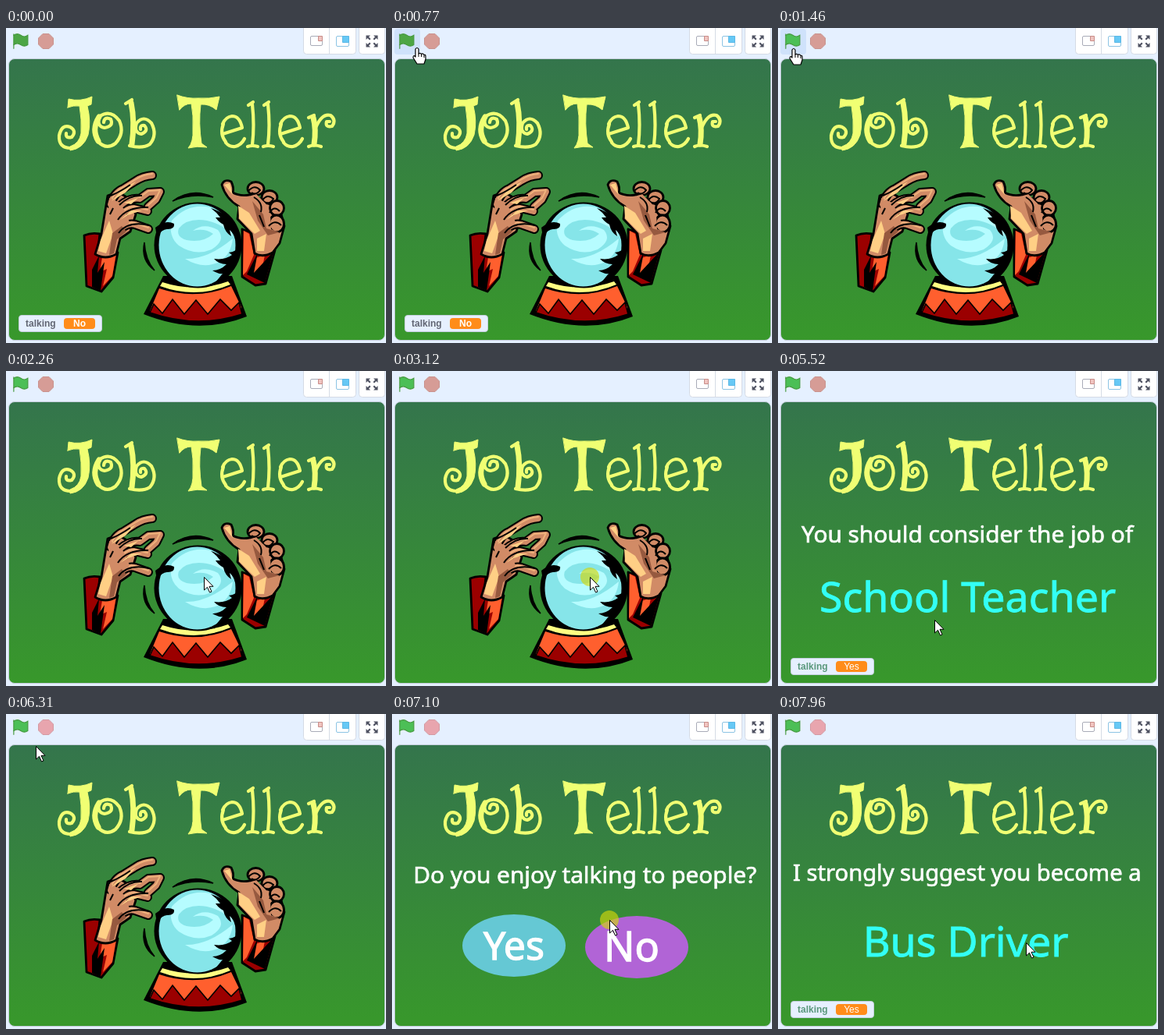
Animation of 486x404 px, one loop 8 s. Source, as an HTML page:

```html
<!DOCTYPE html>
<html lang="en">
<head>
<meta charset="utf-8">
<title>Job Teller</title>
<style>
html, body { margin: 0; width: 100%; height: 100%; overflow: hidden; background: #e5f0ff }
svg { display: block }
.title { fill: none; stroke: #f0ff73; stroke-width: 4.2; stroke-linecap: round; stroke-linejoin: round }
.title .stem { stroke-width: 7 }
.title .solid { fill: #f0ff73; stroke-width: 1 }
.line { font: 400 29.8px "Noto Sans", sans-serif; fill: #fff; stroke: #fff; stroke-width: .7 }
.choice { font-size: 50px; stroke-width: 1.3 }
.job { font-size: 53.7px; fill: #33fff5; stroke: #33fff5; stroke-width: .9 }
.label { font: 12px "Liberation Sans", Arial, sans-serif }
.outline { stroke: #000; stroke-width: 2.8; stroke-linejoin: round }
.skin { fill: #d18b66 }
.light { fill: #ffcf85 }
.shade { fill: #96593f }
.finger { fill: none; stroke-linecap: round; stroke-linejoin: round }
.red { fill: #9b0000 }
.orange { fill: #ff5f2e }
.white { fill: #fff; stroke: #000; stroke-linejoin: round }
</style>
</head>
<body>
<svg width="486" height="404" viewBox="0 0 486 404">
  <defs>
    <linearGradient id="sky" x2="0" y2="1">
      <stop stop-color="#34754c"/><stop offset="1" stop-color="#38982b"/>
    </linearGradient>
    <g id="e"><path d="M277 136L302 128Q299 113 289 113Q281 114 277 123"/><path class="stem" d="M278 123Q273 136 281 146"/><path d="M281 147Q286 153 293 152Q301 150 305 142"/></g>
    <g id="l"><path class="stem" d="M315 98Q318 125 315 150"/><path d="M310 99L316 95M309 152Q315 150 322 152"/></g>
    <path id="corner" d="M1.500 7V1.500H7L5 3.500L7.500 6L6 7.500L3.500 5Z"/>
    <g id="leftFingers" class="finger">
      <path d="M134 226Q138 211 150 206L166 196Q175 190 187 189"/>
      <path d="M146 228Q158 217 171 219L182 211L197 210L192 220L182 229"/>
      <path d="M141 247Q152 231 164 231L181 235"/>
      <path d="M143 262Q153 249 165 252L182 258"/>
    </g>
  </defs>

  <rect id="hover" x="3" y="1" width="33" height="33" rx="4" fill="#cfe2fb"/>
  <g id="flag" stroke="#45993d" stroke-width="1" stroke-linecap="round" transform="translate(9 7) scale(1.17)">
    <path d="M.75 2A6.440 6.440 0 0 1 8.440 2A6.440 6.440 0 0 0 16.130 2V12.400A6.440 6.440 0 0 1 8.440 12.400A6.440 6.440 0 0 0 .75 12.400"/>
    <path d="M.75 16.500V.75"/>
  </g>
  <path id="stop" d="M47 7.500H55L60.500 13V21L55 26.500H47L41.500 21V13Z"/>
  <g fill="#fff" stroke="#d5dbe5">
    <rect x="380.500" y="-4" width="67" height="37.500" rx="4"/>
    <path d="M413.500 0V33"/>
    <rect x="451.500" y="-4" width="33" height="37.500" rx="4"/>
    <rect x="389.500" y="10.500" width="15" height="12" rx="1.500" stroke="#a9acb8"/>
    <rect x="422.500" y="10.500" width="16" height="13" rx="1.500" stroke="#8cc4e4"/>
  </g>
  <path d="M399.500 10.500H404.500V16.500H399.500Z" fill="#f0c4c0" stroke="#c98d88"/>
  <path d="M430.500 10.500H438.500V18.500H430.500Z" fill="#66c8f5" stroke="#5cb8e6"/>
  <g fill="#4f5262" transform="translate(468 17)">
    <use href="#corner" x="-9" y="-9"/>
    <use href="#corner" x="-9" y="-9" transform="scale(-1 1)"/>
    <use href="#corner" x="-9" y="-9" transform="scale(1 -1)"/>
    <use href="#corner" x="-9" y="-9" transform="scale(-1)"/>
  </g>
  <rect x="3.500" y="39.500" width="481" height="361" rx="7.500" fill="url(#sky)" stroke="#c3ccd9"/>

  <g class="title" role="img" aria-label="Job Teller">
    <path class="solid" d="M79 102L80 91Q95 95 110 88L109 98L104 100Q109 120 105 137Q99 155 82 157L82 152Q94 148 96 135Q97 117 94 100Q86 99 79 102Z"/>
    <path d="M83 154Q67 154 68 138Q71 123 82 127Q91 132 84 140Q76 142 77 135"/>
    <path class="stem" d="M119 114Q109 130 118 145"/>
    <path d="M117 145Q128 157 140 148Q152 135 145 119Q134 104 120 113Q115 126 126 128Q138 126 134 117Q126 113 125 121"/>
    <path class="stem" d="M160 96Q165 120 161 149"/>
    <path d="M153 97L161 92M158 151Q175 155 184 149Q194 137 186 122Q176 111 167 122Q163 134 173 136Q183 132 177 125Q171 124 172 130"/>
    <path class="solid" d="M219 86Q232 91 246 90Q260 91 273 88L269 105Q260 97 249 98Q246 122 250 148L257 153Q244 151 233 154Q240 146 239 130Q240 112 237 97Q228 97 222 105Z"/>
    <use href="#e"/><use href="#l"/><use href="#l" x="20"/><use href="#e" x="74"/>
    <path class="stem" d="M393 115Q397 130 394 149"/>
    <path d="M387 115L394 112M387 152Q394 149 403 152M396 128Q404 109 415 112Q423 118 417 126Q408 128 410 120L414 120"/>
  </g>

  <g id="cover">
    <path d="M213 222Q238 204 265 217Q237 211 213 222ZM177 275Q172 298 190 311Q178 297 177 275Z" stroke="#000" stroke-width="1.500"/>
    <!-- crystal ball and stand -->
    <path d="M201 318H289L308 370Q246 395 176 367Z"/>
    <path class="orange" d="M196 334Q243 350 288 331L301 358L300 366Q244 384 184 363Z"/>
    <path class="red" d="M189 354L200 366L213 348L228 367L243 349L258 367L274 348L288 362L298 352L302 367Q244 386 184 365Z" stroke="#000" stroke-width="1.600"/>
    <path d="M200 326Q243 340 284 325L287 329Q243 348 197 331Z" fill="#ffff82"/>
    <ellipse cx="245.500" cy="278.500" rx="56" ry="55"/>
    <ellipse cx="244.500" cy="278.500" rx="49" ry="53" fill="#86e5e9"/>
    <g fill="#b6fcff">
      <path d="M212 247Q233 224 261 230Q286 242 290 268Q280 252 257 247Q232 243 221 257Q217 268 231 272Q252 276 265 264Q254 256 239 260Q253 249 271 259Q282 272 263 284Q242 293 221 279Q207 267 212 247Z"/>
      <path d="M229 296Q258 297 290 270Q288 290 273 300Q252 310 229 296Z"/>
    </g>
    <path d="M262 231Q290 240 298 264L293 271Q291 263 286 259L288 267Q280 262 278 252Q272 249 268 243L274 243Q269 236 262 231ZM300 279Q295 287 285 288L289 291Q280 298 266 296Q272 303 282 303Q274 311 264 311Q272 316 277 315L268 326Q296 314 300 279ZM191 256Q204 245 215 251Q216 258 207 258Q200 257 193 268Z"/>
    <!-- left hand -->
    <path class="outline red" d="M100 266Q109 262 120 264L117 291L143 288L137 320L122 338L103 331Z"/>
    <path class="orange" d="M123 294Q133 296 141 289L136 318L124 331L129 309L120 313Z"/>
    <path d="M110 310L119 292L117 314L126 300L121 337L110 332Z"/>
    <path class="outline skin" d="M130 215Q146 208 156 219L166 239L159 261L146 270L141 290Q127 298 114 290L122 264Z"/>
    <use href="#leftFingers" stroke="#000" stroke-width="12"/>
    <use href="#leftFingers" stroke="#d18b66" stroke-width="7.800"/>
    <use href="#leftFingers" stroke="#efb27c" stroke-width="2" transform="translate(0 -2)"/>
    <path class="skin" d="M132 218L146 224L153 237L158 249L146 267L129 262Z"/>
    <path class="light" d="M135 222L150 206L166 197L153 211ZM151 224L169 218L160 226ZM121 272L132 247L137 264L128 289L118 286ZM146 246L160 234L174 234L156 240Z"/>
    <path class="shade" d="M136 263L148 254L154 261L142 271L138 289L132 291ZM148 216L168 205L183 193L170 204Z"/>
    <path d="M145 227Q158 214 174 215M143 246Q154 229 182 230M144 263Q156 247 183 253M134 215Q148 209 159 201M133 239L137 231" fill="none" stroke="#000" stroke-width="2"/>
    <!-- right hand -->
    <path class="outline red" d="M302 258L313 262L318 289L344 285L332 328L319 330L302 319Z"/>
    <path class="orange" d="M304 260L311 264L317 291L308 312L303 317ZM319 295L331 291L325 323L316 318Z"/>
    <path d="M308 316L322 288L317 314L342 287L331 327Z"/>
    <path class="outline skin" d="M276 201Q279 193 288 197Q292 205 290 211Q299 216 311 214L329 220L351 235L356 254L350 276L341 288Q328 295 318 289L314 264L296 245L298 229Q281 219 276 201Z"/>
    <g class="outline skin">
      <ellipse cx="319.500" cy="206" rx="10.500" ry="8.500"/>
      <ellipse cx="337" cy="217" rx="10" ry="8.500"/>
      <ellipse cx="346.500" cy="231" rx="9" ry="9.500"/>
      <ellipse cx="346" cy="251" rx="9.500" ry="11"/>
    </g>
    <path class="skin" d="M301 219L320 213L332 225L338 238L339 258L350 263L338 282L320 285L317 263L299 243Z"/>
    <path class="light" d="M297 228L311 237L325 260L318 264L298 244ZM321 270L333 264L330 286L321 286ZM279 201L286 199L290 214Z"/>
    <path class="shade" d="M315 222L329 239L333 257L350 262L335 266L322 247Z"/>
    <path d="M310 209Q318 200 325 208Q320 215 314 211M328 221Q334 212 342 219Q338 226 333 224M337 237Q343 227 350 235M336 254Q344 245 352 253M317 217Q329 224 326 236M324 240L330 255" fill="none" stroke="#000" stroke-width="2"/>
  </g>

  <g id="question" class="line">
    <text x="27.200" y="217">Do you enjoy talking to people?</text>
    <ellipse cx="156" cy="297" rx="66" ry="40" fill="#65c8d4" stroke="none"/>
    <ellipse cx="313" cy="299" rx="66" ry="40" fill="#b164d6" stroke="none"/>
    <text class="choice" x="117" y="314.500">Yes</text>
    <text class="choice" style="font-size:52px" x="271" y="317">No</text>
  </g>
  <g id="teacher" class="line">
    <text x="30" y="220">You should consider the job of</text>
    <text class="job" x="53" y="308.500">School Teacher</text>
  </g>
  <g id="driver" class="line">
    <text style="font-size:29.200px" x="19" y="214">I strongly suggest you become a</text>
    <text class="job" x="108.700" y="311">Bus Driver</text>
  </g>

  <g id="monitor" class="label">
    <rect x="16.500" y="368.500" width="106" height="21" rx="3.500" fill="#e6f0ff" stroke="#c3cfdd"/>
    <text id="name" x="25" y="383" font-weight="bold">talking</text>
    <rect x="74" y="372" width="40" height="14" rx="4" fill="#ff8c1a"/>
    <text id="value" x="94" y="383" fill="#fff" text-anchor="middle"></text>
  </g>

  <g id="cursor">
    <circle id="click" r="12" fill="#d2d70a" opacity=".65"/>
    <path id="arrow" class="white" d="M.5 .5V17L4.500 13.300L7.500 20L10 19L7 12.300H12Z"/>
    <g id="hand">
      <path class="white" stroke-width="1.200" d="M-2 2Q0-1 2 2V8Q4 6.500 5.500 8.500Q7.500 7 9 9.500Q11 8.500 11 11.500V15L9 21H0L-5 13Q-5 9-2 12Z"/>
      <path d="M2 8V12M5.500 9V12M9 10V13" stroke="#000"/>
    </g>
  </g>
</svg>
<script>
const LOOP = 8000;
const el = id => document.getElementById(id);
const show = (id, on) => el(id).style.display = on ? '' : 'none';

// cursor stops: time, x, y
const stops = [
  [70, 306, 328], [840, 26, 18], [930, 26, 18], [990, 20, 26], [1460, 20, 26],
  [2260, 253, 264], [3520, 253, 264], [3990, 184, 290], [4840, 184, 290],
  [5060, 200, 322], [5450, 200, 322], [5520, 200, 319], [5840, 20, 25],
  [6220, 20, 25], [6790, 278, 264], [7180, 278, 264], [7650, 317, 293], [LOOP, 317, 293]
];
const clicks = [[1160, 1310], [3120, 3200], [4750, 4920], [6070, 6220], [7030, 7180], [7880, 7960]];
const scenes = [[0, 'cover'], [3200, 'question'], [4840, 'teacher'], [6150, 'cover'], [7100, 'question'], [7960, 'driver']];

function cursorAt(t) {
  const i = Math.max(1, stops.findIndex(s => s[0] > t));
  const [t0, x0, y0] = stops[i - 1], [t1, x1, y1] = stops[i];
  const p = Math.max(0, (t - t0) / (t1 - t0)), ease = p * p * (3 - 2 * p);
  return [x0 + (x1 - x0) * ease, y0 + (y1 - y0) * ease];
}

function draw(t) {
  const scene = scenes.filter(s => s[0] <= t).pop()[1];
  for (const id of ['cover', 'question', 'teacher', 'driver']) show(id, id === scene);

  const [x, y] = cursorAt(t);
  const onFlag = t >= 70 && x < 36 && y < 34;
  el('cursor').setAttribute('transform', `translate(${Math.round(x)} ${Math.round(y)})`);
  show('cursor', t >= 70);
  show('hand', onFlag);
  show('arrow', !onFlag);
  show('hover', onFlag);
  show('click', clicks.some(([from, to]) => t >= from && t < to));

  const first = t < 1240;
  show('monitor', first || scene === 'teacher' || scene === 'driver');
  el('value').textContent = first ? 'No' : 'Yes';
  el('value').style.fontWeight = first ? 'bold' : 'normal';
  el('name').style.fill = first ? '#626673' : '#5a987c';
  el('flag').style.fill = t < 1160 ? '#4da645' : '#4cbf56';
  const late = t >= 6070;
  el('stop').style.fill = late ? '#e8a5ae' : '#d69c96';
  el('stop').style.stroke = late ? '#d39aa3' : '#c9928e';
}

const start = performance.now();
(function tick() {
  draw((performance.now() - start) % LOOP);
  requestAnimationFrame(tick);
})();
</script>
</body>
</html>
```
